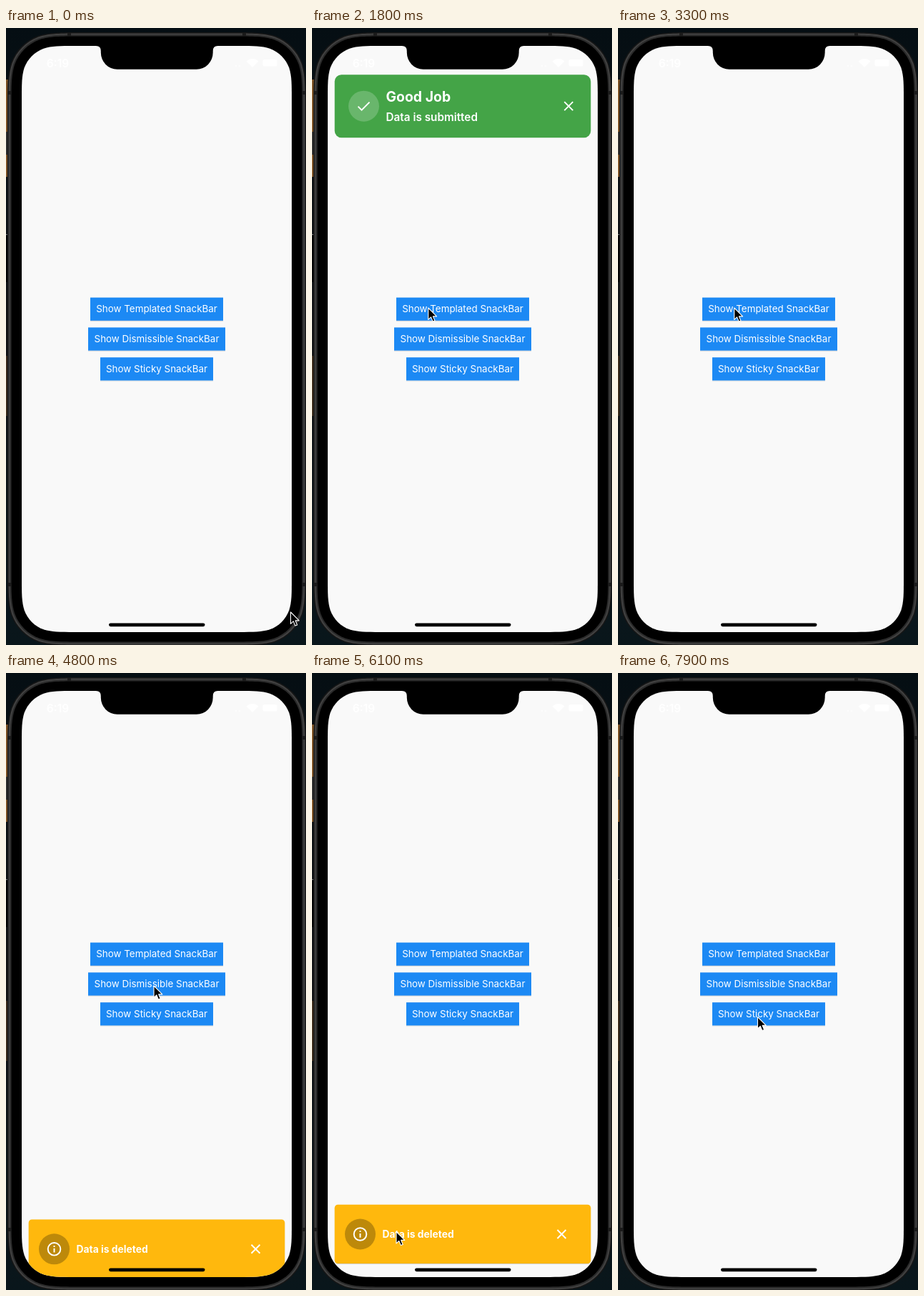
Animation, 420 px wide and 862 px high, one loop 8000 ms. Source, as an HTML page:

```html
<!DOCTYPE html>
<html lang="en">
<head>
<meta charset="utf-8">
<title>Snack bars</title>
<style>
  html, body { margin: 0; width: 100%; height: 100%; overflow: hidden; background: #060f13; }
  svg { display: block; width: 420px; height: 862px; }
  text { font-family: Inter, Roboto, sans-serif; fill: #fff; }
  .label { font-size: 13.42px; text-anchor: middle; }
  .icon { fill: none; stroke: #fff; stroke-width: 1.95; }
</style>
</head>
<body>
<svg viewBox="0 0 420 862">
  <defs>
    <linearGradient id="desk" x2="0" y2="1">
      <stop offset="0" stop-color="#050e13"/>
      <stop offset=".5" stop-color="#131416"/>
      <stop offset="1" stop-color="#09161b"/>
    </linearGradient>
    <clipPath id="screen"><path id="glass"/></clipPath>
    <filter id="soft" x="-10%" y="-20%" width="120%" height="150%">
      <feDropShadow dx="0" dy=".8" stdDeviation=".7" flood-opacity=".2"/>
    </filter>
  </defs>

  <!-- desktop behind the phone -->
  <rect width="420" height="862" fill="url(#desk)"/>
  <g fill="#7d5224">
    <rect y="72" width="3" height="73"/>
    <rect y="177" width="3" height="31"/>
    <rect y="458" width="3" height="84" opacity=".4"/>
  </g>
  <rect y="145" width="3" height="32" fill="#30302f"/>
  <rect y="288" width="3" height="1" fill="#777"/>
  <rect y="290" width="3" height="65" fill="#020202"/>

  <!-- phone body, from the rim inwards -->
  <g id="body"></g>
  <g fill="#1b1b1b">
    <rect x="86" y="7" width="5" height="4"/>
    <rect x="331" y="7" width="5" height="4"/>
    <rect x="3" y="88" width="4" height="5"/>
    <rect x="3" y="775" width="4" height="5"/>
    <rect x="415" y="88" width="4" height="5"/>
    <rect x="415" y="775" width="4" height="5"/>
  </g>

  <g clip-path="url(#screen)">
    <rect x="22" y="25" width="378" height="819" fill="#f9f9f9"/>
    <g id="buttons"></g>

    <g id="success">
      <rect x="31.7" y="70" width="358.6" height="88.2" rx="9.5" fill="#44a447"/>
      <circle cx="72.5" cy="114" r="21.5" fill="#fff" fill-opacity=".2"/>
      <path class="icon" d="M64.5 114.5l5 5 11-11"/>
      <text x="103.5" y="108" font-size="19.4" font-weight="700">Good Job</text>
      <text x="103.5" y="135" font-size="15.3" font-weight="600">Data is submitted</text>
      <path class="icon" d="M353.3 108l12 12m0-12l-12 12"/>
    </g>

    <g id="deleted">
      <rect x="31.7" y="742.7" width="358.6" height="82.3" rx="4.5" fill="#ffb808" filter="url(#soft)"/>
      <circle cx="67.5" cy="784" r="21.5" fill-opacity=".26"/>
      <circle class="icon" cx="67.5" cy="784" r="8.8"/>
      <path class="icon" d="M67.5 779.2v1.9m0 1.9v5.8"/>
      <text x="98.5" y="789" font-size="13.85" font-weight="700">Data is deleted</text>
      <path class="icon" d="M343.5 778l12 12m0-12l-12 12"/>
    </g>

    <!-- status bar -->
    <g fill="#fff">
      <text x="72.5" y="55" font-size="15.5" font-weight="600" text-anchor="middle">6:19</text>
      <path d="M336.5 46.5a12 12 0 0 1 17 0L345 55z"/>
      <rect x="359.5" y="44" width="20" height="9.5" rx="2.5"/>
      <circle cx="322" cy="53" r="1"/>
      <circle cx="327" cy="53" r="1"/>
    </g>
    <path d="M126 24v1q6.800 0 6.800 7v2.300a23 23.500 0 0 0 23 23.500h110.900a23 23.500 0 0 0 23-23.500v-2.300q0-7 6.800-7v-1z"/>
    <rect x="144" y="831.4" width="134.5" height="4.8" rx="2.4"/>
  </g>

  <path id="cursor" d="M0 0v16.400l3.800-3.500 2.600 6.200 2.800-1.100-2.600-6.100h5.200z"
        stroke="#fff" stroke-width="1.1" stroke-linejoin="round"/>
</svg>

<script>
const LOOP = 8000;
const $ = id => document.getElementById(id);

const linear = p => p;
const easeOut = p => 1 - (1 - p) ** 3;
const easeIn = p => p * p;
const smooth = p => p * p * (3 - 2 * p);

// Rectangle whose corners blend gradually into the straight sides.
function smoothRect(x, y, w, h, r) {
  const curve = [1.529, 0, 1.088, 0, .868, 0, .631, .075, .373, .169,
                 .169, .373, .075, .631, 0, .868, 0, 1.088, 0, 1.529];
  const pairs = [];
  for (let i = 0; i < curve.length; i += 2) pairs.push([curve[i] * r, curve[i + 1] * r]);
  const back = [...pairs].reverse();
  const corner = (list, right, bottom) => {
    const pts = list.map(([a, b]) => `${right ? x + w - a : x + a} ${bottom ? y + h - b : y + b}`);
    return `${pts[0]}C${pts.slice(1).join(" ")}`;
  };
  return "M" + [
    corner(pairs, false, false), corner(back, false, true),
    corner(pairs, true, true), corner(back, true, false)
  ].join("L") + "Z";
}

$("glass").setAttribute("d", smoothRect(22, 25, 378, 819, 48.5));

const rims = [[0, "#161616"], [1.5, "#424242"], [3.5, "#2b2b2b"], [5.5, "#000"]];
$("body").innerHTML = rims.map(([d, fill]) =>
  `<path d="${smoothRect(2 + d, 6 + d, 418 - 2 * d, 857 - 2 * d, 68 - d)}" fill="${fill}"/>`).join("");

const buttons = [
  ["Show Templated SnackBar", 186],
  ["Show Dismissible SnackBar", 192],
  ["Show Sticky SnackBar", 158]
];
$("buttons").innerHTML = buttons.map(([label, w], i) => {
  const y = 376.6 + i * 41.8;
  return `<rect x="${211 - w / 2}" y="${y}" width="${w}" height="32.2" fill="#1e89f4" filter="url(#soft)"/>
    <text class="label" x="211" y="${y + 20.8}">${label}</text>`;
}).join("");

// Steps: [time, x, y, easing towards this step]
const tracks = {
  cursor: [
    [0, 398.5, 816], [100, 398.5, 816], [900, 162.8, 391, smooth],
    [3600, 162.8, 391], [4300, 207, 437, smooth],
    [5000, 207, 437], [5800, 118, 780.5, smooth],
    [6350, 118, 780.5], [6800, 290, 776, smooth],
    [6900, 290, 776], [7200, 286, 710, easeIn],
    [7800, 195.5, 480.5, easeOut]
  ],
  success: [
    [0, 0, -160], [1457, 0, -160], [1957, 0, 0, easeOut],
    [2920, 0, 0], [3240, 0, -160, easeIn]
  ],
  deleted: [
    [0, 0, 110], [4588, 0, 110], [5088, 0, 0, easeOut],
    [6350, 0, 0], [6800, 172, 0, smooth], [7000, 400, 0, easeOut]
  ]
};

function at(steps, t) {
  const i = steps.findIndex(s => s[0] > t);
  if (i < 0) return steps[steps.length - 1].slice(1, 3);
  const [t0, x0, y0] = steps[i - 1];
  const [t1, x1, y1, ease = linear] = steps[i];
  const p = ease((t - t0) / (t1 - t0));
  return [x0 + (x1 - x0) * p, y0 + (y1 - y0) * p];
}

const start = performance.now();
function draw(now) {
  const t = Math.max(0, now - start) % LOOP;
  for (const id in tracks) {
    $(id).setAttribute("transform", `translate(${at(tracks[id], t)})`);
  }
  requestAnimationFrame(draw);
}
draw(start);
</script>
</body>
</html>
```
